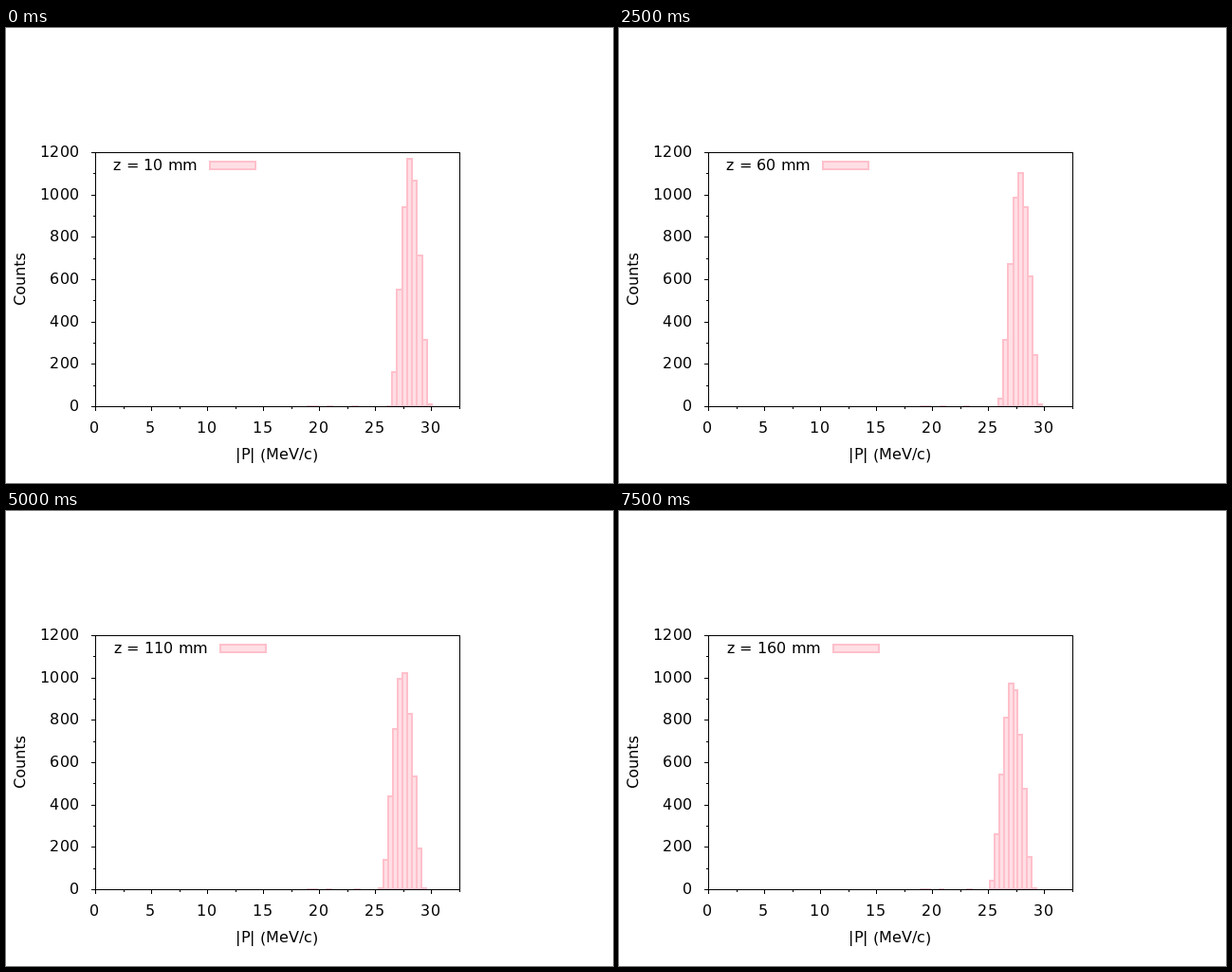
Recreate the animation shown at these times as a matplotlib script. Size 640x480 px, loop 8000 ms.

```python
import numpy as np
import matplotlib.pyplot as plt
from matplotlib.animation import FuncAnimation
from matplotlib.patches import PathPatch, Rectangle
from matplotlib.textpath import TextPath
from matplotlib.transforms import Affine2D

W, H, DPI = 640, 480, 100
FRAMES, INTERVAL = 16, 500
LEFT, RIGHT, TOP, BASE = 94, 478, 131, 399
X_MAX, Y_MAX = 32.5, 1200
BINS, BIN_START = 25, 318.1
STRAYS = [319, 326, 341, 369]  # lone slow particles
EDGE, FILL = "#ffc0cb", "#ffdfe5"
TEXT_PX = 16

plt.rcParams["font.family"] = "DejaVu Sans"
plt.rcParams["font.size"] = TEXT_PX * 72 / DPI

fig = plt.figure(figsize=(W / DPI, H / DPI), dpi=DPI, facecolor="white")
ax = fig.add_axes([0, 0, 1, 1])
ax.set_xlim(0, W)
ax.set_ylim(H, 0)
ax.axis("off")


def x_px(value):
    return LEFT + round(value * (RIGHT - LEFT) / X_MAX)


def y_px(count):
    return BASE - round(count * (BASE - TOP) / Y_MAX)


def block(x, y, w, h, color="black", z=5):
    return ax.add_patch(Rectangle((x, y), w, h, fc=color, lw=0, zorder=z))


def advance(text):
    """Pen position after the text, found by adding an end marker."""
    def right(s):
        return TextPath((0, 0), s, size=TEXT_PX).get_extents().x1
    return right(text + "|") - right("|")


def label(x, y, text, align):
    """Set each glyph on a whole pixel; align 0 is left, 1 is right."""
    start = x - align * advance(text)
    # The offset undoes the renderer's rounding of side bearings.
    return [ax.text(round(start + advance(text[:i])) - 0.45, y, char,
                    ha="left", va="baseline", zorder=6)
            for i, char in enumerate(text) if char != " "]


class Box:
    """Filled box with a two-pixel border centred on its edges."""

    def __init__(self):
        self.outer = block(0, 0, 1, 1, EDGE, 2)
        self.inner = block(0, 0, 1, 1, FILL, 2)

    def place(self, x0, y0, x1, y1):
        w, h = x1 - x0, y1 - y0
        self.outer.set_bounds(x0 - 1, y0 - 1, w + 2, h + 2)
        self.inner.set_bounds(x0 + 1, y0 + 1, w - 2, max(h - 2, 0))

    def show(self, visible):
        self.outer.set_visible(visible)
        self.inner.set_visible(visible)


def draw_axes():
    for y in (TOP, BASE):
        block(LEFT, y, RIGHT - LEFT + 1, 1)
    for x in (LEFT, RIGHT):
        block(x, TOP, 1, BASE - TOP + 1)

    for i in range(14):
        x, major = x_px(2.5 * i), i % 2 == 0
        block(x, BASE, 1, 5 if major else 3)
        if major:
            label(x - 0.42, 427, str(5 * i // 2), 0.5)

    for i in range(13):
        y, major = y_px(100 * i), i % 2 == 0
        size = 4 if major else 2
        block(LEFT - size, y, size, 1)
        if major:
            label(77, y + 5, str(100 * i), 1)

    label((LEFT + RIGHT) / 2 - 0.42, 455, "|P| (MeV/c)", 0.5)
    title = "Counts"
    middle = (TOP + BASE + advance(title)) / 2
    turn = Affine2D().scale(1, -1).rotate_deg(-90).translate(20, middle)
    path = TextPath((0, 0), title, size=TEXT_PX).transformed(turn)
    ax.add_patch(PathPatch(path, fc="black", lw=0))


draw_axes()
bars = [Box() for _ in range(BINS)]
swatch = Box()
legend = []


def bin_counts(t, edges):
    """Bell with steep flanks that drifts down and widens, plus strays."""
    mean, sigma = 20.2 - 0.86 * t, 1.51 + 0.295 * t
    z = (np.arange(BINS) - mean) / sigma
    bell = np.exp(-0.35 * z**2 - 0.0013 * (z + 0.06)**8)
    shoulder = 0.055 * np.exp(-((z - 1.65) / 0.25)**2)
    return 1775 / sigma * (bell + shoulder) + np.histogram(STRAYS, edges)[0]


def update(step):
    # The bins span the range up to the largest value, which slowly falls.
    end = np.interp(step, [0, 8, 15], [449.2, 444.72, 439.9])
    edges = np.linspace(BIN_START, end, BINS + 1)
    counts = bin_counts(step / (FRAMES - 1), edges)
    snapped = np.rint(edges)
    for bar, x0, x1, count in zip(bars, snapped, snapped[1:], counts):
        bar.place(x0, y_px(count), x1, BASE)
        bar.show(count >= 1)

    z = 10 * (step + 1)
    x = 226 if z >= 100 else 215
    swatch.place(x, 141, x + 48, 149)
    for glyph in legend:
        glyph.remove()
    legend[:] = label(x - 13.3, 150, f"z = {z} mm", 1)


anim = FuncAnimation(fig, update, frames=FRAMES, interval=INTERVAL,
                     repeat=True, repeat_delay=0)
plt.show()
```
